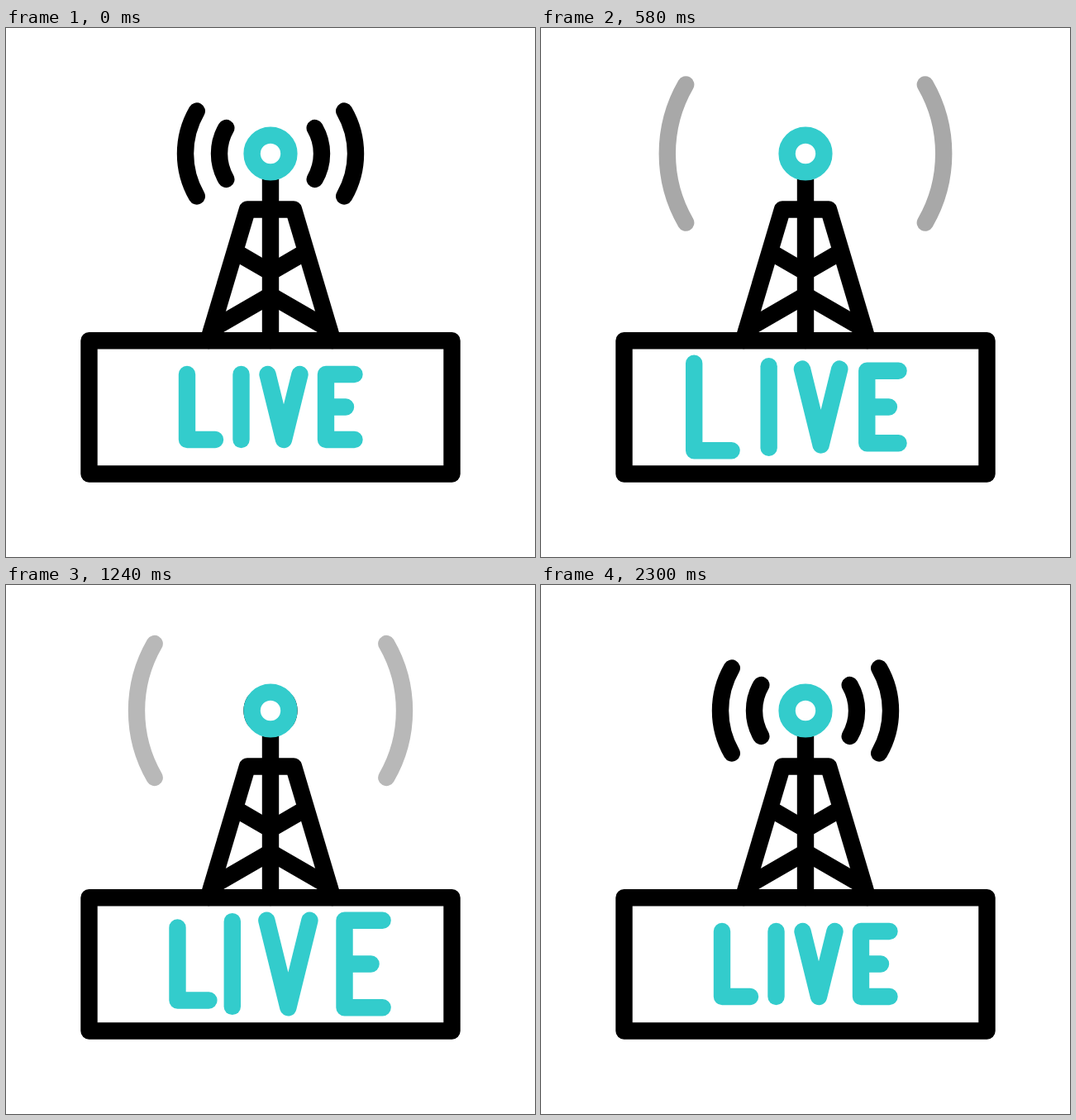
Recreate the animation shown at these times as an HTML page. Size 640x640 px, loop 2.4 s.

```html
<!DOCTYPE html>
<html>
<head>
<meta charset="utf-8">
<title>Live broadcast</title>
<style>
  html, body { margin: 0; width: 100%; height: 100%; overflow: hidden; background: #fff; }
  svg { display: block; width: 100%; height: 100%; }
  path, rect, circle {
    fill: none; stroke: #000; stroke-width: 20.4;
    stroke-linecap: round; stroke-linejoin: round;
  }
  .teal { stroke: #33cccc; }
  #waves path, #letters path { vector-effect: non-scaling-stroke; }
</style>
</head>
<body>
<svg viewBox="0 0 640 640">
  <g id="waves"></g>
  <path d="M320 180V378M244.8 378L292 219.5H348L395.2 378"/>
  <path d="M281 272.9L320 295.5L359 272.9M249 364.3L320 323.3L391 364.3"/>
  <rect x="100.5" y="378.2" width="439" height="161.3"/>
  <circle class="teal" cx="320" cy="152" r="22.4" style="fill:#fff"/>
  <g id="letters"></g>
</svg>
<script>
const LOOP = 2400;
const GROWTH = 0.336;
const ARCS = 'M-.866-.5A1 1 0 0 0-.866.5M.866-.5A1 1 0 0 1 .866.5';

// Radius travels from r0 to r1 during move; opacity drops to zero during fade.
const waves = [
  { r0: 103, r1: 280, move: [0, 561], fade: [280, 560] },
  { r0: 62, r1: 177.5, move: [0, 712], fade: [375, 712] },
  { r0: 0, r1: 280, move: [533, 1242], fade: [890, 1240] },
  { r0: 0, r1: 177.5, move: [517, 1402], fade: [983, 1377] },
  { r0: 0, r1: 103, move: [1066, 1646] },
  { r0: 0, r1: 62, move: [1066, 1690] },
];

// Letter outlines are relative to the centre of the sign.
const letters = [
  { d: 'M-101-39.5V39.5H-67', grow: [60, 600], shrink: [950, 1428] },
  { d: 'M-35.5-39.5V39.5', grow: [180, 780], shrink: [1125, 1710] },
  { d: 'M-3.5-39.5L16 39.5L35.5-39.5', grow: [262, 912], shrink: [1305, 1910] },
  { d: 'M101.5-39.5H67V39.5H101.5M67 0H91', grow: [269, 1089], shrink: [1490, 2300] },
];

function addPath(parent, d, className) {
  const path = document.createElementNS('http://www.w3.org/2000/svg', 'path');
  path.setAttribute('d', d);
  path.setAttribute('class', className);
  return document.getElementById(parent).appendChild(path);
}

function ease(time, [start, end]) {
  const p = Math.min(1, Math.max(0, (time - start) / (end - start)));
  return p * p * (3 - 2 * p);
}

for (const wave of waves) wave.path = addPath('waves', ARCS, '');
for (const letter of letters) letter.path = addPath('letters', letter.d, 'teal');

function draw(now) {
  const time = now % LOOP;
  for (const { path, r0, r1, move, fade } of waves) {
    const radius = r0 + (r1 - r0) * ease(time, move);
    const opacity = fade ? 1 - ease(time, fade) : 1;
    path.setAttribute('transform', `translate(320 152) scale(${Math.max(radius, 0.1)})`);
    path.setAttribute('opacity', radius > 1 ? opacity : 0);
  }
  for (const { path, grow, shrink } of letters) {
    const scale = 1 + GROWTH * (ease(time, grow) - ease(time, shrink));
    path.setAttribute('transform', `translate(320 458.5) scale(${scale})`);
  }
}

const began = performance.now();
function tick() {
  draw(performance.now() - began);
  requestAnimationFrame(tick);
}
tick();
</script>
</body>
</html>
```
